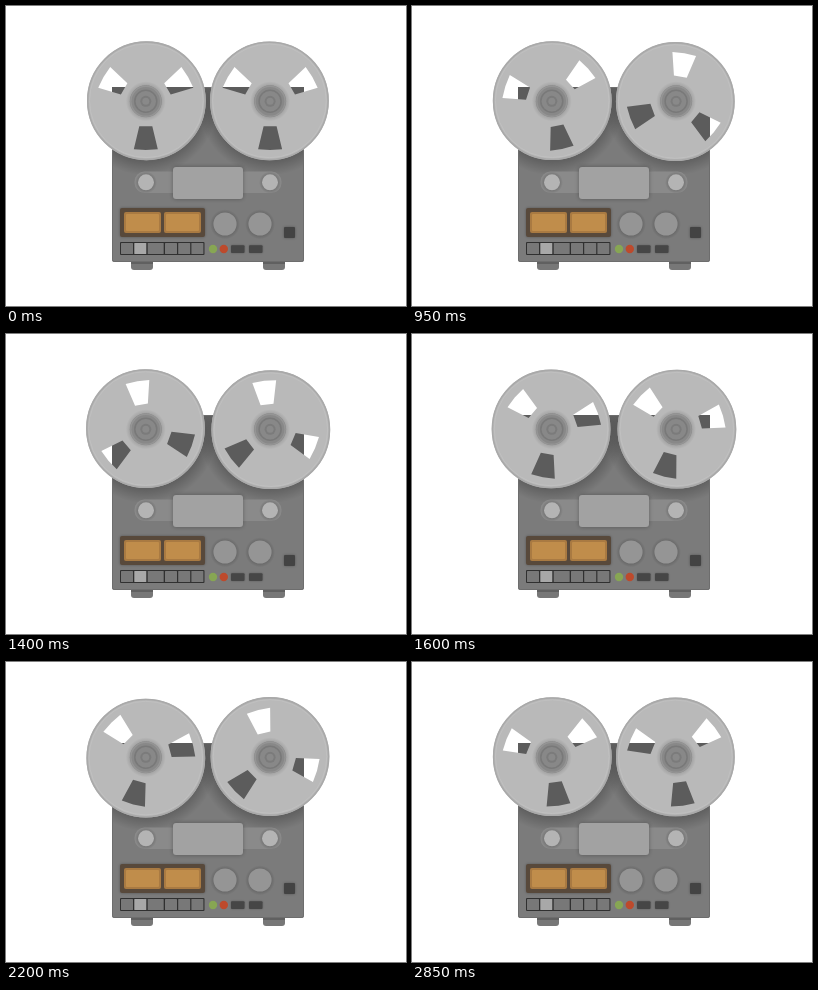
Write an HTML page with a canvas that moves like this. It is 400 px wide and 300 px high and loops after 3000 ms.

```html
<!DOCTYPE html>
<html lang="en">
<head>
<meta charset="utf-8">
<title>Tape recorder</title>
<style>
  html, body { margin: 0; width: 100%; height: 100%; overflow: hidden; background: #fff; }
  canvas { display: block; width: 400px; height: 300px; }
</style>
</head>
<body>
<canvas id="stage" width="400" height="300"></canvas>
<script>
const ctx = document.getElementById('stage').getContext('2d');
const LOOP = 3000, STEP = 50, LAST = 2850;
const RAD = Math.PI / 180;

// Reels: pivot, direction of the off-centre disc, and [ms, degrees turned counterclockwise]
const reels = [
  { x: 139.8, y: 95.3, lean: -45,
    keys: [[650, 0], [1150, 28], [1400, 70], [1800, 150], [2200, 225], [2850, 368]] },
  { x: 264.1, y: 95.3, lean: -145,
    keys: [[650, 0], [1150, 106], [1400, 187], [1800, 258], [2200, 314], [2850, 368]] }
];

// Smooth monotone curve through the keys, at rest at both ends
function turnAt(keys, t) {
  const end = keys.length - 1;
  if (t <= keys[0][0]) return keys[0][1];
  if (t >= keys[end][0]) return keys[end][1];
  const slope = i => (keys[i + 1][1] - keys[i][1]) / (keys[i + 1][0] - keys[i][0]);
  const tangent = i => {
    if (i === 0 || i === end) return 0;
    const a = slope(i - 1), b = slope(i);
    return 2 * a * b / (a + b);
  };
  let i = 0;
  while (t > keys[i + 1][0]) i++;
  const [t0, v0] = keys[i], [t1, v1] = keys[i + 1];
  const d = t1 - t0, u = (t - t0) / d, w = 1 - u;
  return v0 * (1 + 2 * u) * w * w + v1 * u * u * (3 - 2 * u)
    + d * u * w * (tangent(i) * w - tangent(i + 1) * u);
}

function box(x, y, w, h, r, fill) {
  ctx.beginPath();
  ctx.roundRect(x, y, w, h, r);
  ctx.fillStyle = fill;
  ctx.fill();
}

function disc(x, y, r, fill) {
  ctx.beginPath();
  ctx.arc(x, y, r, 0, 2 * Math.PI);
  ctx.fillStyle = fill;
  ctx.fill();
}

function ring(x, y, r, width, stroke) {
  ctx.beginPath();
  ctx.arc(x, y, r, 0, 2 * Math.PI);
  ctx.lineWidth = width;
  ctx.strokeStyle = stroke;
  ctx.stroke();
}

function shade(x, y, inner, outer, alpha) {
  const g = ctx.createRadialGradient(x, y, inner, x, y, outer);
  g.addColorStop(0, `rgba(0,0,0,${alpha})`);
  g.addColorStop(1, 'rgba(0,0,0,0)');
  disc(x, y, outer, g);
}

function softBox(x, y, w, h, r, fill, blur = 3) {
  ctx.save();
  ctx.shadowColor = 'rgba(0,0,0,.3)';
  ctx.shadowBlur = blur;
  box(x, y, w, h, r, fill);
  ctx.restore();
}

function drawBody() {
  for (const x of [125, 257]) {
    box(x, 254, 22, 10, 3, '#777');
    box(x, 254, 22, 4, 0, '#606060');
  }
  box(106, 81, 192, 175, 2, '#7b7b7b');
  ctx.save();
  ctx.clip();
  for (const { x, y } of reels) shade(x, y + 2, 56, 72, 0.24);
  ctx.restore();
  ctx.beginPath();
  ctx.roundRect(106.5, 81.5, 191, 174, 2);
  ctx.lineWidth = 1;
  ctx.strokeStyle = '#6d6d6d';
  ctx.stroke();
}

function drawControls() {
  box(128.5, 165.5, 147, 21.5, 10, '#8a8a8a');
  softBox(167, 161, 70, 32, 3, '#a2a2a2', 4);
  for (const x of [140, 264]) {
    shade(x, 176.5, 7, 11, 0.18);
    disc(x, 176.3, 8, '#b4b4b4');
  }

  softBox(114, 202, 85, 29, 2, '#58493b');
  for (const x of [118, 158]) {
    box(x, 206, 37, 21, 2, '#a97a42');
    box(x + 2, 208, 33, 17, 1, '#c08d4b');
  }
  for (const x of [219, 254]) {
    shade(x, 218.3, 10, 15, 0.2);
    disc(x, 218, 11.6, '#959595');
  }
  softBox(278, 221, 11, 11, 1, '#434343');

  box(114, 236, 84.5, 13, 1, '#303030');
  const cells = [[115, 12], [128.3, 12], [141.7, 16], [159, 12], [172.2, 12], [185.4, 12]];
  cells.forEach(([x, w], i) => box(x, 237, w, 11, 0.5, i === 1 ? '#a8a8a8' : '#787878'));

  disc(207, 243, 4.2, '#87a653');
  disc(217.8, 243, 4.2, '#bd4a2c');
  for (const x of [225, 243]) softBox(x, 239.3, 13.5, 7.7, 1, '#464646', 2);
}

function drawReel({ x, y, lean, keys }, t) {
  const turn = -turnAt(keys, t);
  const dir = (lean + turn) * RAD;
  const cx = x + 0.8 * Math.cos(dir), cy = y + 0.8 * Math.sin(dir);

  // body seen through the openings
  ctx.save();
  ctx.beginPath();
  ctx.rect(106, 81, 192, 175);
  ctx.clip();
  disc(x, y, 52, '#5c5c5c');
  ctx.restore();

  ctx.beginPath();
  ctx.arc(cx, cy, 59.4, 0, 2 * Math.PI);
  for (let k = 0; k < 3; k++) {
    const a = (90 + 120 * k + turn) * RAD;
    const c = Math.cos(a), s = Math.sin(a);
    [[25, -6.5], [48, -12], [48.8, 0], [48, 12], [25, 6.5]].forEach(([r, side], i) => {
      const px = x + r * c - side * s, py = y + r * s + side * c;
      i ? ctx.lineTo(px, py) : ctx.moveTo(px, py);
    });
    ctx.closePath();
  }
  ctx.fillStyle = '#b9b9b9';
  ctx.fill('evenodd');

  ring(cx, cy, 58.6, 1.6, '#a9a9a9');
  ring(cx, cy, 56.8, 1, '#c0c0c0');
  shade(x, y, 15, 20, 0.14);
  disc(x, y, 16, '#888');
  ring(x, y, 15, 1.5, '#959595');
  ring(x, y, 11, 1.5, '#797979');
  disc(x, y, 5.5, '#7b7b7b');
  disc(x, y, 3.5, '#898989');
}

function draw(now) {
  const t = Math.min(LAST, Math.floor((now % LOOP) / STEP) * STEP);
  ctx.fillStyle = '#fff';
  ctx.fillRect(0, 0, 400, 300);
  drawBody();
  drawControls();
  for (const reel of reels) drawReel(reel, t);
}

const start = performance.now();
function tick() {
  draw(performance.now() - start);
  requestAnimationFrame(tick);
}
tick();
</script>
</body>
</html>
```
